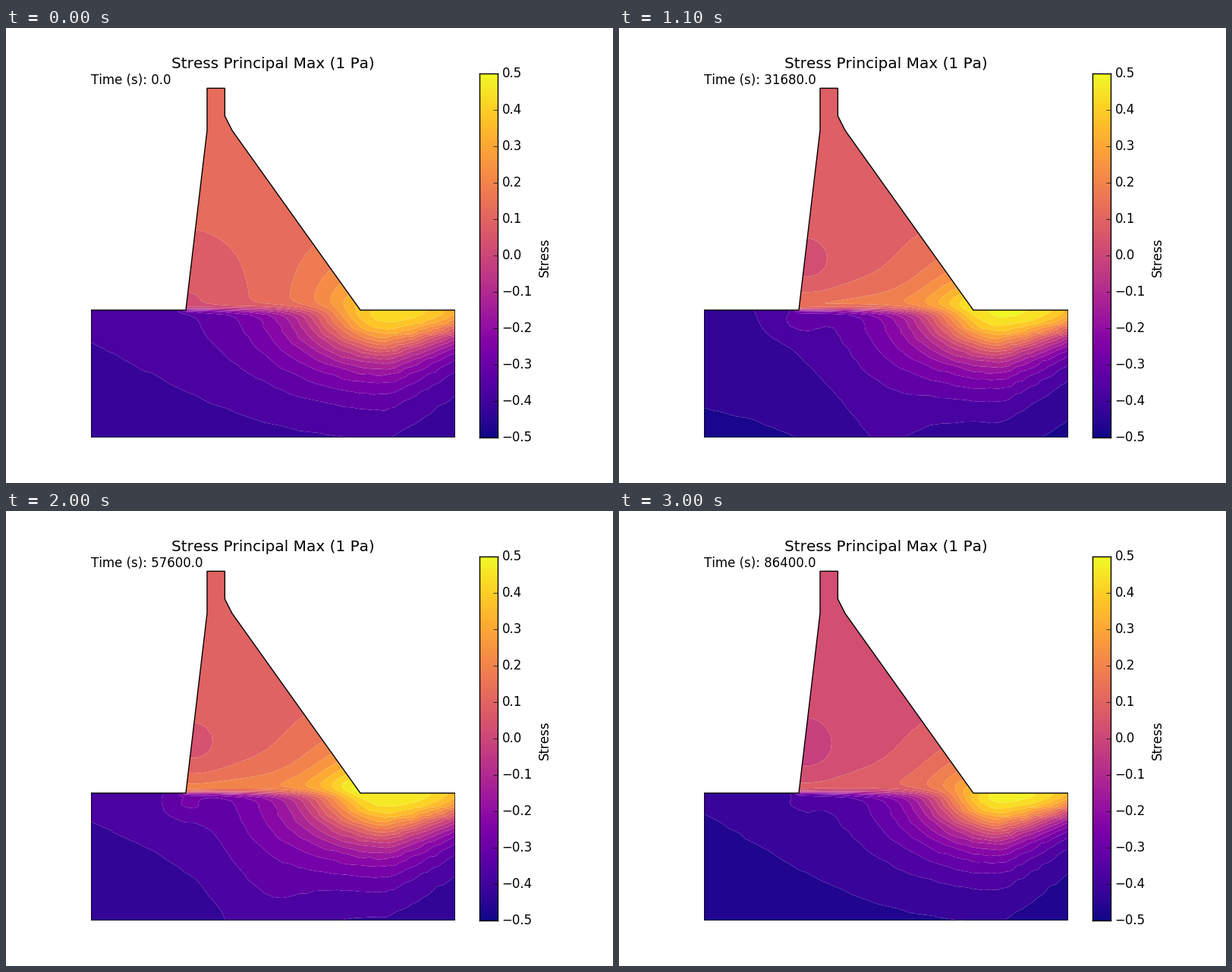
Animation of 800x600 px, one loop 3100 ms. Source, as a matplotlib script:

```python
import numpy as np
import matplotlib.pyplot as plt
from matplotlib.animation import FuncAnimation
from matplotlib.patches import Polygon
from matplotlib.tri import Triangulation

FRAMES = 31
GROUND, HEEL, TOE = 372, 237, 467
plt.rcParams.update({"font.family": "DejaVu Sans", "text.kerning_factor": 6,
                     "ytick.alignment": "center"})
plasma = plt.get_cmap("plasma")

# base: stress at the dam top, step: stress per colour band.
# All else is in bands: ground far away at the top and the bottom, the bulb
# behind the toe with its half-width and half-depth, lift of the lower middle,
# a spot in the ground, and in the dam: toe, foot, pocket, sole.
START = dict(base=.125, step=.05, top=-10.7, deep=-11.45, bulb=16.8, wide=100, high=60,
             lift=0, spot=0, spot_x=237, toe=5, foot=-1.9, pocket=0, sole=0)
COOL = dict(base=.03, step=.05, top=-9.7, deep=-10.3, bulb=18.7, wide=86, high=54,
            lift=0, spot=.6, spot_x=237, toe=5, foot=0, pocket=-1.1, sole=1.2)
RISE = dict(base=.07, step=.05, top=-10.6, deep=-11.3, bulb=18.7, wide=92, high=57,
            lift=.6, spot=.9, spot_x=237, toe=5.9, foot=0, pocket=-1, sole=1.8)
PEAK = dict(base=.095, step=.0526, top=-9.7, deep=-10.65, bulb=17, wide=101, high=61,
            lift=1.1, spot=1.3, spot_x=237, toe=6.8, foot=0, pocket=-.9, sole=2.4)
FLIP = dict(base=-.1, step=.0525, top=9.8, deep=10.7, bulb=-17.1, wide=80, high=54,
            lift=0, spot=1.2, spot_x=295, toe=-5.3, foot=2.2, pocket=0, sole=0)
TIMELINE = [(0, START), (4, COOL), (8, RISE), (14, PEAK), (20, PEAK),
            (21, FLIP), (25, FLIP), (26, START), (29, COOL), (30, COOL)]


def state(frame):
    for (t0, a), (t1, b) in zip(TIMELINE, TIMELINE[1:]):
        if frame <= t1:
            w = (frame - t0) / (t1 - t0)
            return {k: (1 - w) * a[k] + w * b[k] for k in a}


def bell(x, y, cx, cy, rx, ry):
    return np.exp(-((x - cx) / rx) ** 2 - ((y - cy) / ry) ** 2)


def ground_field(x, y, p):
    depth = np.maximum(y - GROUND, 0)
    dx = x - 505
    high = p["high"] - 0.28 * np.maximum(dx, 0)
    wide = np.where(dx < 0, p["wide"], 170)
    r = np.hypot(dx / wide, depth / high)
    far = p["top"] + (p["deep"] - p["top"]) * depth / 168
    return (far + p["bulb"] / (1 + r ** 2.7)
            + p["lift"] * depth / 168 * np.exp(-((x - 345) / 70) ** 2)
            + p["spot"] * bell(x, y, p["spot_x"], 386, 30, 20))


def dam_field(x, y, p):
    height = np.maximum(GROUND - y, 0)
    toe = np.hypot(x - TOE, height)
    foot = np.hypot(x - HEEL, height)
    return (p["toe"] * np.exp(-(toe / 60) ** 1.3)
            + p["foot"] * np.exp(-(foot / 85) ** 1.2)
            + p["pocket"] * bell(x, y, 247, 312, 42, 45)
            + p["sole"] * np.exp(-(height / 28) ** 1.5))


def stress(x, y, p):
    """Dam and ground, joined by a thin layer that widens from the heel."""
    thick = np.clip(1.5 + 0.012 * (x - HEEL), 1.5, 4)
    share = 1 / (1 + np.exp(np.clip((y - 371.5) / thick, -50, 50)))
    share = share * np.clip((x - 225) / 12, 0, 1) * np.clip((492 - x) / 25, 0, 1)
    low = ground_field(x, y, p)
    return low + (dam_field(x, y, p) - low) * share


def grid_triangles(rows, cols, first):
    n = first + np.arange(rows * cols).reshape(rows, cols)
    a, b, c, d = (q.ravel() for q in (n[:-1, :-1], n[:-1, 1:], n[1:, :-1], n[1:, 1:]))
    return np.vstack([np.c_[a, b, d], np.c_[a, d, c]])


# Two structured grids that share the nodes along the dam base.
s = np.linspace(0, 1, 21)
gx = np.concatenate([np.linspace(112, HEEL, 12)[:-1], HEEL + (TOE - HEEL) * s,
                     np.linspace(TOE, 592, 12)[1:]])
gy = GROUND + 168 * np.linspace(0, 1, 22) ** 1.4
dy = np.concatenate([[79, 116], np.arange(135, 345, 10), np.arange(345, 373, 3)])
left = np.interp(dy, [79, 135, 372], [265, 265, HEEL])
right = np.interp(dy, [79, 116, 135, 372], [288.4, 288.4, 298, TOE])
ground_x, ground_y = np.meshgrid(gx, gy)
dam_x = left[:, None] + (right - left)[:, None] * s
dam_y = np.repeat(dy[:, None], len(s), axis=1)

nodes = np.c_[np.r_[ground_x.ravel(), dam_x.ravel()],
              np.r_[ground_y.ravel(), dam_y.ravel()]]
tris = np.vstack([grid_triangles(*ground_x.shape, 0),
                  grid_triangles(*dam_x.shape, ground_x.size)])
nodes, index = np.unique(nodes.round(3), axis=0, return_inverse=True)
node_x, node_y = nodes.T

# Nodes inside the ground are drawn slightly off, as in an irregular mesh.
rng = np.random.default_rng(4)
inside = (node_y > 386) & (node_y < 539) & (node_x > 113) & (node_x < 591)
shift = rng.uniform(-1.5, 1.5, nodes.shape) * inside[:, None]
mesh = Triangulation(*(nodes + shift).T, index.ravel()[tris])

fig = plt.figure(figsize=(8, 6), dpi=100, facecolor="white")
ax = fig.add_axes([112 / 800, 60 / 600, 480 / 800, 480 / 600])
ax.axis("off")
outline = [(112, GROUND), (HEEL, GROUND), (265, 135), (265, 79.4), (288.4, 79.4),
           (288.4, 116), (298, 135), (TOE, GROUND), (592, GROUND), (592, 540), (112, 540)]
ax.add_patch(Polygon(outline, fill=False, ec="black", lw=1, zorder=5))


def label(x, y, text, size=12, **kw):
    return fig.text(x / 800, 1 - y / 600, text, fontsize=size, **kw)


label(352, 53, "Stress Principal Max (1 Pa)", 14.4, ha="center", va="baseline")
label(709.5, 302, "Stress", ha="center", va="center", rotation=90)
clock = label(112, 74, "", va="baseline")

bar = fig.add_axes([624 / 800, 60 / 600, 24 / 800, 480 / 600])
bar.imshow(np.linspace(0, 1, 256)[:, None], cmap=plasma, origin="lower",
           aspect="auto", extent=(0, 1, -0.5, 0.5), interpolation="nearest")
ticks = np.linspace(-0.5, 0.5, 11).round(1)
bar.set_xticks([])
bar.set_yticks(ticks, [f"{v + 0.0:.1f}".replace("-", "\u2212") for v in ticks])
bar.yaxis.tick_right()
bar.tick_params(axis="y", direction="in", length=4, width=0.5, pad=4, labelsize=12)
for side in bar.spines.values():
    side.set_linewidth(1)

bands = np.arange(-13, 13)
levels = np.arange(-13.5, 13)
drawn = []


def update(frame):
    while drawn:
        drawn.pop().remove()
    p = state(frame)
    colors = plasma(np.clip(0.5 + p["base"] + bands * p["step"], 0, 1))
    drawn.append(ax.tricontourf(mesh, stress(node_x, node_y, p), levels=levels,
                                colors=colors, antialiased=True))
    ax.set_xlim(112, 592)
    ax.set_ylim(540, 60)
    clock.set_text(f"Time (s): {frame * 2880:.1f}")


anim = FuncAnimation(fig, update, frames=FRAMES, interval=100,
                     init_func=lambda: None, repeat=True, repeat_delay=0)
plt.show()
```
